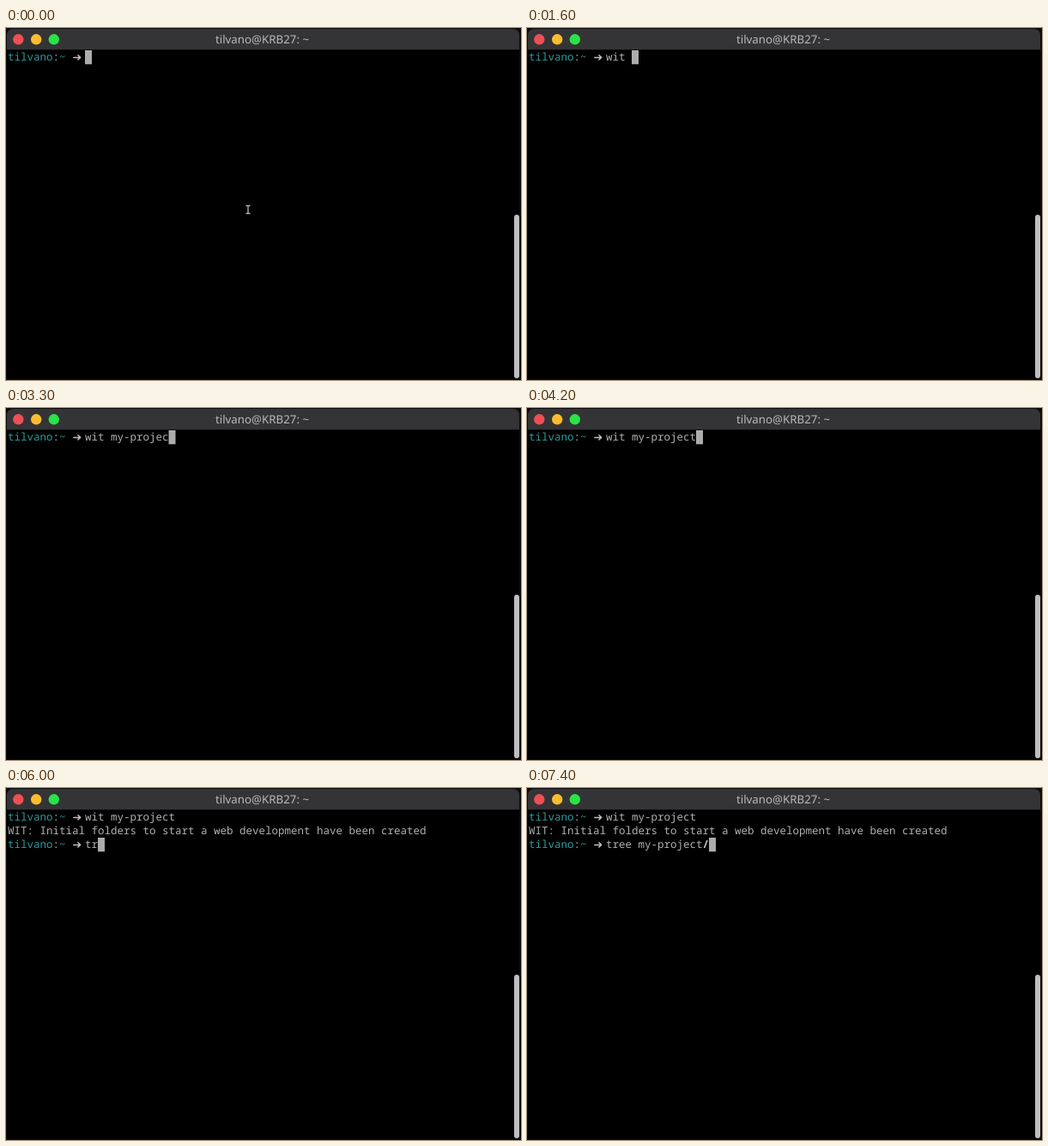
These frames come from a looping animation (600 by 411 pixels, 8 s). An HTML page:

```html
<!DOCTYPE html>
<html lang="en">
<head>
<meta charset="utf-8">
<title>Terminal</title>
<style>
  html, body { margin: 0; width: 100%; height: 100%; overflow: hidden; background: #000; }
  svg { display: block; width: 600px; height: 411px; }
  text { font: 12.5px "Noto Sans Mono", monospace; fill: #b0b0b0; white-space: pre; text-rendering: geometricPrecision; }
  .title { font: 13.3px "Noto Sans", sans-serif; fill: #b9b9ba; text-anchor: middle; }
  .user { fill: #2b9b9c; }
  .arrow { fill: none; stroke: #c0c0c0; stroke-width: 1.5; stroke-linecap: round; stroke-linejoin: round; }
</style>
</head>
<body>
<svg viewBox="0 0 600 411">
  <defs>
    <g id="prompt">
      <text x="2" y="38"><tspan class="user">tilvano</tspan>:<tspan class="user">~</tspan></text>
      <path class="arrow" d="M78.8 34.4H86M83.9 31.8L86.6 34.4L83.9 37"/>
    </g>
  </defs>
  <rect width="600" height="411" fill="#0d0b0b"/>
  <path d="M1 25.5V9Q1 1 9 1H590Q598 1 598 9V25.5Z" fill="#343436"/>
  <rect x="1" y="25.5" width="597" height="384.5" fill="#000"/>
  <circle cx="14.3" cy="13.3" r="6.2" fill="#ee4f54"/>
  <circle cx="35.2" cy="13.3" r="6.2" fill="#fbbd2f"/>
  <circle cx="55.8" cy="13.3" r="6.2" fill="#29e347"/>
  <text class="title" x="298.5" y="18">tilvano@KRB27: ~</text>
  <rect x="592" y="218" width="6" height="191" rx="3" fill="#bfbdc0"/>

  <rect id="cursor" width="8" height="16.3" fill="#acacac"/>
  <use href="#prompt"/>
  <text id="first" x="92" y="38"></text>
  <text id="output" x="2" y="54">WIT: Initial folders to start a web development have been created</text>
  <g id="next">
    <use href="#prompt" y="32"/>
    <text x="92" y="70"><tspan id="second"></tspan><tspan id="slash" font-weight="bold" fill="#d4d4d4">/</tspan></text>
  </g>

  <g id="pointer">
    <path id="beam" d="M-2.5 -4.5H2.5M0 -4.5V4.5M-2.5 4.5H2.5" fill="none" stroke="#b5b5b5" stroke-width="1.3"/>
    <path id="tip" d="M0 0V10L2.4 7.8L4 11L5.4 10.3L4 7.2H7Z" fill="#111" stroke="#ddd" stroke-width=".7"/>
  </g>
</svg>
<script>
const LOOP = 8000;
const PROMPT_AT = 4500;
const OUTPUT_AT = 4300;
const firstCommand = "wit my-project";
const secondCommand = "tree my-project"; // the closing slash is set in bold

// When each character is typed; equal times arrive together.
const firstKeys = [800, 1100, 1300, 1600, 1700, 1900, 2300, 2500, 2800, 2900, 3100, 3100, 3300, 3500];
const secondKeys = [5800, 6000, 6100, 6300, 6400, 6600, 6700, ...Array(9).fill(7400)];
const cursorOff = [[4000, 4200], [4800, 5400], [7200, 7400]];

const byId = id => document.getElementById(id);
const show = (id, on) => byId(id).setAttribute("visibility", on ? "visible" : "hidden");
const typed = (keys, t) => keys.filter(key => key <= t).length;

function drawCursor(t, firstCount, secondCount) {
  const column = t < OUTPUT_AT ? firstCount : secondCount;
  const left = t >= OUTPUT_AT && t < PROMPT_AT ? 2 : 92;
  byId("cursor").setAttribute("x", left + column * 7.5);
  byId("cursor").setAttribute("y", t < OUTPUT_AT ? 26 : 58);
  show("cursor", !cursorOff.some(([from, to]) => t >= from && t < to));
}

function drawPointer(t) {
  const p = Math.min(t / 700, 1);
  const ease = p * p * (3 - 2 * p);
  const x = 282 - 266 * ease;
  const y = 212 - 201 * ease;
  byId("pointer").setAttribute("transform", `translate(${x} ${y})`);
  show("beam", t < 800 && y >= 25);
  show("tip", t < 800 && y < 25);
}

function draw(now) {
  const t = Math.floor(now % LOOP / 100) * 100;
  const firstCount = typed(firstKeys, t);
  const secondCount = typed(secondKeys, t);
  byId("first").textContent = firstCommand.slice(0, firstCount);
  byId("second").textContent = secondCommand.slice(0, secondCount);
  show("slash", secondCount > secondCommand.length);
  show("output", t >= OUTPUT_AT);
  show("next", t >= PROMPT_AT);
  drawCursor(t, firstCount, secondCount);
  drawPointer(t);
}

const start = performance.now();
function tick() {
  draw(performance.now() - start);
  requestAnimationFrame(tick);
}
tick();
</script>
</body>
</html>
```
